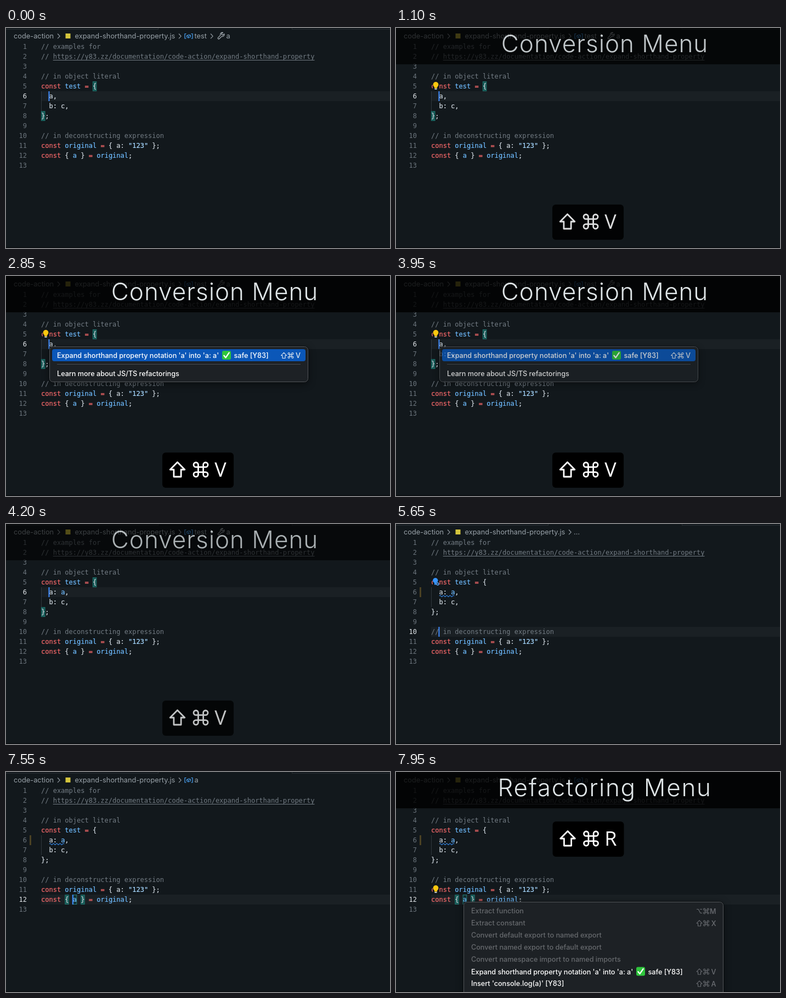
An HTML page for the animation above (8000 ms loop, 700 px wide and 400 px high).

```html
<!DOCTYPE html>
<html lang="en">
<head>
<meta charset="utf-8">
<title>Code action demo</title>
<style>
html, body { margin: 0; width: 100%; height: 100%; overflow: hidden; background: #12181c; }
svg { display: block; width: 700px; height: 400px; }
text { white-space: pre; }
.code { font: 12px "DejaVu Sans Mono", monospace; color: #cdd5dc; }
.code, .code tspan { fill: currentColor; stroke: currentColor; stroke-width: .22px; }
.code.num, .code .com { stroke: none; }
.num { text-anchor: end; color: #6b747c; }
.com { color: #737c84; }
.key { color: #f4686a; }
.var { color: #6fbcff; }
.str { color: #a5d6ff; }
.crumb { font: 12.8px Inter, sans-serif; fill: #98a1a8; }
.menu { font: 500 12.62px Inter, sans-serif; fill: #fff; }
.menu .off { fill: #66696d; }
.title { font: 300 44px Inter, sans-serif; fill: #dfe5e7; text-anchor: middle; }
.cap { font: 500 36px "Open Sans", sans-serif; fill: #fff; text-anchor: middle; }
.line { fill: none; stroke-linejoin: round; }
.panel { filter: drop-shadow(0 3px 7px rgba(0, 0, 0, .45)); }
</style>
</head>
<body>
<svg id="stage" viewBox="0 0 700 400"></svg>
<script>
const LOOP = 8000, CW = 7.224, LEFT = 64;
const baseline = n => 20 + 18 * n;
const lineTop = n => 7 + 18 * n;
const colX = c => LEFT + c * CW;

const rect = (x, y, w, h, fill, more = '') =>
  `<rect x="${x}" y="${y}" width="${w}" height="${h}" fill="${fill}" ${more}/>`;
const text = (x, y, cls, body, more = '') =>
  `<text x="${x}" y="${y}" class="${cls}" ${more}>${body}</text>`;
const path = (d, color, width, more = '') =>
  `<path class="line" d="${d}" stroke="${color}" stroke-width="${width}" ${more}/>`;
const group = (id, body) => `<g id="${id}">${body}</g>`;

// Code: k = keyword, v = variable, s = string, c = comment
const names = { k: 'key', v: 'var', s: 'str', c: 'com' };
const paint = src => src.replace(/<(\w):([^>]*)>/g,
  (_, k, s) => `<tspan class="${names[k]}">${s}</tspan>`);
const codeLine = (n, src) => text(LEFT, baseline(n), 'code', paint(src));

const lines = {
  1: '<c:// examples for>',
  2: '<c:// https://y83.zz/documentation/code-action/expand-shorthand-property>',
  4: '<c:// in object literal>',
  5: '<k:const> <v:test> <k:=> {',
  7: '  b: c,',
  8: '};',
  10: '<c:// in deconstructing expression>',
  11: '<k:const> <v:original> <k:=> { a: <s:"123"> };',
  12: '<k:const> { <v:a> } <k:=> <v:original>;'
};

const bracket = (line, col) =>
  rect(colX(col) + .4, lineTop(line) + .5, 6.6, 17, '#165854', 'stroke="#1f6e6a"');
const chevron = x => path(`M${x} 10.5l4.2 4.3l-4.2 4.3`, '#98a1a8', 1.1);

const glyphs = {
  shift: 'M0 -13.5L13.3 0H6.6V13H-6.6V0H-13.3Z',
  cmd: 'M-4.6 -8.8V8.8A4.2 4.2 0 1 1 -8.8 4.6H8.8A4.2 4.2 0 1 1 4.6 8.8' +
       'V-8.8A4.2 4.2 0 1 1 8.8 -4.6H-8.8A4.2 4.2 0 1 1 -4.6 -8.8Z',
  alt: 'M-13 -9H-5L5 9H13M3 -9H13'
};
const glyph = (name, x, y, scale, color) =>
  path(glyphs[name], color, 2.8, `transform="translate(${x} ${y}) scale(${scale})"`);

const shortcut = (right, y, mod, letter, color) =>
  glyph(mod, right - 30.5, y, .38, color) + glyph('cmd', right - 18, y, .38, color) +
  text(right, y + 4.6, 'menu', letter, `style="fill:${color}" text-anchor="end"`);

const check = (x, y) => rect(x, y, 16, 16, '#2fc53c', 'rx="3"') +
  path(`M${x + 3.3} ${y + 8.6}l3.2 3.8l6.2 -9`, '#fff', 2.3, 'stroke-linecap="round"');

const expandItem = (x, y) =>
  text(x, y + 4.6, 'menu', "Expand shorthand property notation 'a' into 'a: a'") +
  check(x + 301, y - 8.5) + text(x + 322.5, y + 4.6, 'menu', 'safe [Y83]');

const panel = (x, y, w, h) =>
  rect(x - .5, y - .5, w + 1, h + 1, '#06090b', 'rx="6.5" class="panel"') +
  rect(x + .5, y + .5, w - 1, h - 1, '#1d2125', 'rx="6" stroke="#53575b"');

const keyCap = (x, y, letter) => rect(x, y, 130, 64, '#000', 'rx="6"') +
  glyph('shift', x + 27.5, y + 31, 1, '#fff') + glyph('cmd', x + 70, y + 31, 1, '#fff') +
  text(x + 106, y + 44, 'cap', letter);

const banner = (id, label, spacing, cap) => group(id,
  rect(0, 0, 700, 66, '#000', 'opacity=".82"') +
  text(380.5, 43.6, 'title', label, `letter-spacing="${spacing}"`) + cap);

const bulb = (id, y, body) => group(id, rect(67, y - 8, 11.5, 17, '#12181c') + body);
const yellowBulb = y =>
  `<circle cx="72.5" cy="${y - 2}" r="4.9" fill="#fdc70f"/>` +
  rect(70, y + 1.5, 5, 3, '#fdc70f') + rect(70.4, y + 5, 4.2, 1.8, '#d3d7da');
const blueBulb = y =>
  `<circle cx="71.8" cy="${y - 2.2}" r="4.7" fill="#3794ff"/>` +
  rect(70, y + 1.5, 3, 4, '#3794ff') +
  `<circle cx="76" cy="${y + 4}" r="2" fill="#12181c" stroke="#62aaff" stroke-width="1.5"/>`;

const disabled = [
  ['Extract function', 'alt', 'M'], ['Extract constant', 'shift', 'X'],
  ['Convert default export to named export'],
  ['Convert named export to default export'],
  ['Convert namespace import to named imports']
].map(([label, mod, key], i) => {
  const y = 253 + 22 * i;
  return text(137, y + 4.2, 'menu', `<tspan class="off">${label}</tspan>`) +
    (mod ? shortcut(583.5, y, mod, key, '#6b6e73') : '');
}).join('');

const symbolIcon = path('M328.5 10.5h-2.5v8.5h2.5M337.5 10.5h2.5v8.5h-2.5', '#4aa3f5', 1.2) +
  path('M329.5 13.8l4 -1.8l3 1.3v3l-4 1.7l-3 -1.3zl3 1.3l4 -1.8M332.5 15.1v2.9', '#4aa3f5', 1);
const wrench = path('M395.5 8.3a3.7 3.7 0 0 0 -4.6 4.8l-4.2 4.2a1.5 1.5 0 0 0 2.2 2.2' +
  'l4.2 -4.2a3.7 3.7 0 0 0 4.7 -4.7l-2.4 2.2l-2 -.4l-.4 -2z', '#a9b1b7', 1.2);

let numbers = '';
for (let n = 1; n <= 13; n++) numbers += text(38, baseline(n), 'code num', n, `id="n${n}"`);

const $ = id => document.getElementById(id);
$('stage').innerHTML =
  rect(0, 0, 700, 400, '#12181c') +
  rect(0, 2, 278, 1, '#272d32') + rect(521, 2, 179, 1, '#272d32') +
  rect(277, 0, 1, 3, '#272d32') + rect(521, 0, 1, 3, '#272d32') +
  rect(0, 398, 700, 2, '#0c1013') +
  group('current', rect(LEFT, 0, 636, 18, '#1a2024')) +
  text(14, 19.3, 'crumb', 'code-action') + chevron(94) +
  rect(108.5, 10, 9, 9, '#d3c43c') +
  text(125.5, 19.3, 'crumb', 'expand-shorthand-property.js') + chevron(315) +
  group('icon', symbolIcon) + text(343.5, 19.3, 'crumb', '', 'id="symbol"') +
  group('tail', chevron(373) + wrench + text(401.5, 19.3, 'crumb', '', 'id="prop"')) +
  rect(64, lineTop(6), 1, 36, '#30383e') +
  group('outer', bracket(5, 13) + bracket(8, 0)) +
  group('inner', bracket(12, 6) + bracket(12, 10)) +
  group('word', rect(colX(8) + .4, lineTop(12) + .5, 6.6, 17, '#142f32', 'stroke="#27807b"')) +
  numbers +
  Object.entries(lines).map(([n, src]) => codeLine(+n, src)).join('') +
  rect(colX(3), 58, 66 * CW, 1, '#737c84') +
  group('short', codeLine(6, '  a,')) +
  group('long', codeLine(6, '  a: <v:a>,')) +
  group('gutter', rect(43, lineTop(6), 3, 18, '#4b4123')) +
  group('squiggle', path('M79 131q1.5 -2.6 3 0' + 't3 0'.repeat(8), '#3794ff', 1.1)) +
  bulb('bulb1', 105, yellowBulb(105)) + bulb('bulb2', 105, blueBulb(105)) +
  bulb('bulb3', 213, yellowBulb(213)) +
  group('cursor', rect(-1, 0, 2, 18, '#3f8cff')) +
  banner('intro', 'Conversion Menu', 1, keyCap(285, 321, 'V')) +
  group('menu1', panel(79, 128, 472, 65) +
    rect(84, 133, 462, 22, '#3a3e43', 'rx="4" id="pick"') +
    expandItem(93, 144.5) + shortcut(537, 144.5, 'shift', 'V', '#e9edf1') +
    rect(93, 160, 444, 1, '#494d51') +
    text(93, 182, 'menu', 'Learn more about JS/TS refactorings')) +
  banner('outro', 'Refactoring Menu', 1.7, keyCap(285.5, 90, 'R')) +
  group('menu2', panel(123, 236, 474, 190) + disabled +
    expandItem(137, 363) + shortcut(583.5, 363, 'shift', 'V', '#6b6e73') +
    text(137, 389.2, 'menu', "Insert 'console.log(a)' [Y83]") +
    shortcut(583.5, 385, 'shift', 'A', '#6b6e73'));

// [time, line, column]
const moves = [
  [0, 6, 2], [5100, 7, 2], [5250, 8, 2], [5400, 9, 0], [5550, 10, 2], [5700, 11, 2],
  [5850, 12, 2], [6150, 12, 3], [6300, 12, 4], [6450, 12, 5], [6600, 12, 6],
  [6750, 12, 7], [7150, 12, 8]
];
const crumbs = [
  [0, 'test', 'a'], [5250, 'test', 'b'], [5400, 'test', ''], [5550, '…', ''], [7450, 'a', '']
];
// [id, from, to]
const spans = [
  ['short', 0, 4150], ['long', 4150, LOOP], ['gutter', 4300, LOOP], ['squiggle', 4800, LOOP],
  ['bulb1', 200, 4150], ['bulb2', 4550, 5850], ['bulb3', 7600, LOOP],
  ['outer', 0, 5250], ['inner', 6750, LOOP], ['word', 7400, LOOP]
];
// [id, in start, in end, out start, out end]
const fades = [
  ['intro', 800, 1150, 4100, 4500], ['menu1', 1150, 1200, 3900, 4150],
  ['outro', 7600, 7900, 9000, 9100], ['menu2', 7850, 7900, 9000, 9100]
];
const picks = [[0, '#3a3e43'], [2450, '#0b57b8'], [3750, '#1d2125'], [3825, '#0b57b8']];

const at = (table, t) => table.filter(row => row[0] <= t).pop();
const ramp = (t, a, b) => Math.min(1, Math.max(0, (t - a) / (b - a)));
const show = (id, on) => { $(id).style.display = on ? '' : 'none'; };

function render(t) {
  const [, line, col] = at(moves, t);
  const solid = t >= 5100 && t < 7650;
  const blink = t < 5100 && (t + 250) % 1000 < 500;
  show('cursor', solid || blink);
  $('cursor').setAttribute('transform', `translate(${colX(col)} ${lineTop(line)})`);
  $('current').setAttribute('transform', `translate(0 ${lineTop(line)})`);
  for (let n = 1; n <= 13; n++) $('n' + n).style.color = n === line ? '#e3e8ec' : '';

  const [, symbol, prop] = at(crumbs, t);
  show('icon', symbol !== '…');
  $('symbol').setAttribute('x', symbol === '…' ? 324 : 343.5);
  $('symbol').textContent = symbol;
  show('tail', prop);
  $('prop').textContent = prop;

  for (const [id, from, to] of spans) show(id, t >= from && t < to);
  for (const [id, a, b, c, d] of fades) {
    const o = ramp(t, a, b) * (1 - ramp(t, c, d));
    show(id, o > 0);
    $(id).style.opacity = o;
  }
  $('pick').style.fill = at(picks, t)[1];
}

function tick() {
  render(performance.now() % LOOP);
  requestAnimationFrame(tick);
}
tick();
</script>
</body>
</html>
```
